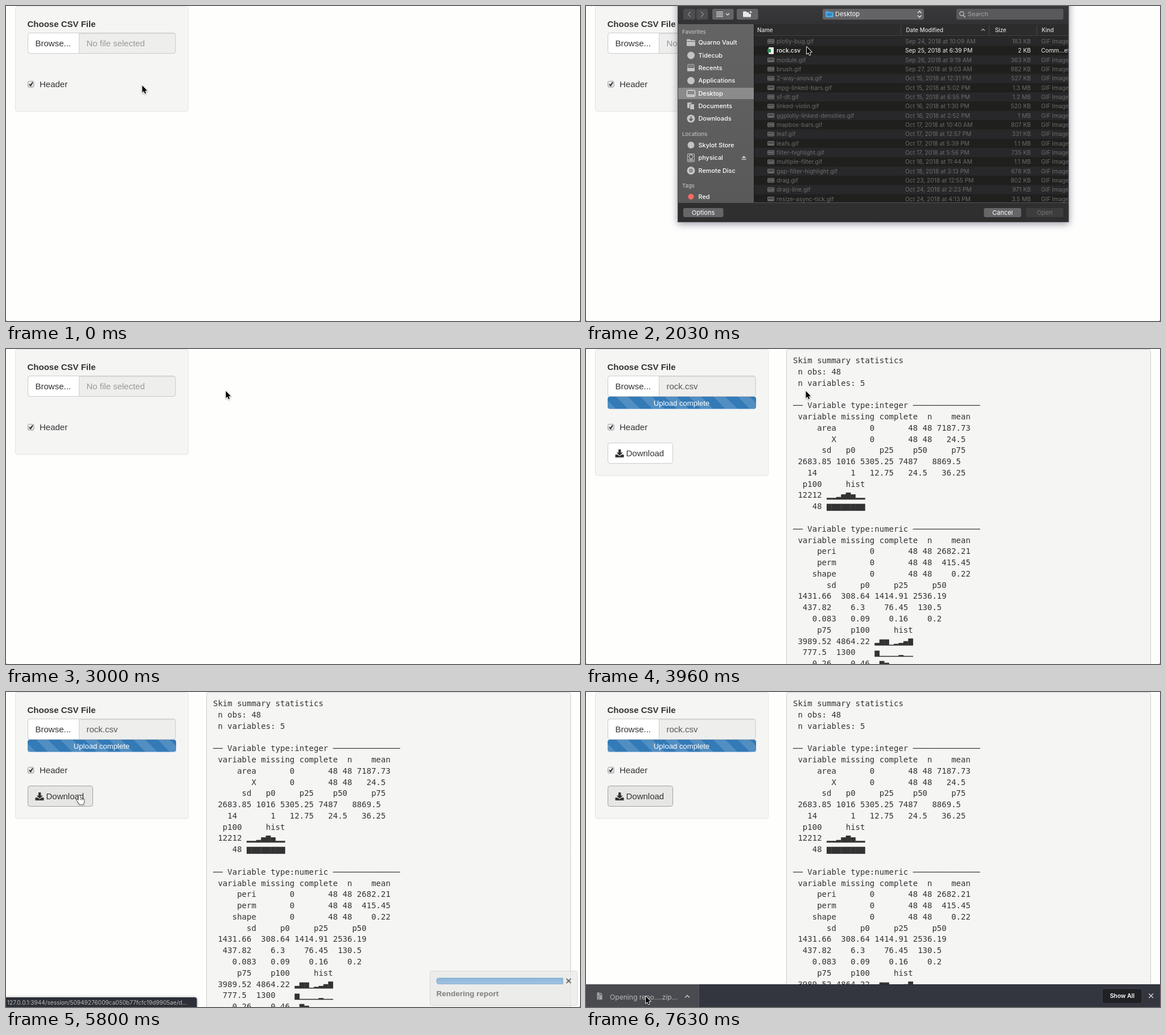
Recreate the animation shown at these times as an HTML page with a canvas. Size 1009 px wide and 555 px high, loop 8000 ms.

```html
<!DOCTYPE html>
<html lang="en">
<head>
<meta charset="utf-8">
<title>Upload and download</title>
<style>
html, body { margin: 0; width: 100%; height: 100%; overflow: hidden; background: #fefefd; }
canvas { display: block; }
</style>
</head>
<body>
<canvas id="stage" width="1009" height="555"></canvas>
<script>
const ctx = document.getElementById('stage').getContext('2d');
const W = 1009, H = 555, LOOP = 8000;
const SANS = '"Liberation Sans", Arial, sans-serif';
const UI = 'Inter, sans-serif';
const MONO = '"DejaVu Sans Mono", monospace';

const clamp = v => Math.max(0, Math.min(1, v));
const span = (t, a, b) => clamp((t - a) / (b - a));
const ease = p => (1 - Math.cos(Math.PI * p)) / 2;

function text(s, x, y, size, color, { font = UI, weight = 400, align = 'left' } = {}) {
  ctx.font = `${weight} ${size}px ${font}`;
  ctx.textAlign = align;
  ctx.fillStyle = color;
  ctx.fillText(s, x, y + size * 0.36);
}

function rect(x, y, w, h, color) {
  ctx.fillStyle = color;
  ctx.fillRect(x, y, w, h);
}

function box(x, y, w, h, r, fill, stroke) {
  ctx.beginPath();
  ctx.roundRect(x, y, w, h, r);
  if (fill) { ctx.fillStyle = fill; ctx.fill(); }
  if (stroke) { ctx.strokeStyle = stroke; ctx.lineWidth = 1; ctx.stroke(); }
}

function line(points, color, width = 1) {
  ctx.beginPath();
  points.forEach(([x, y]) => ctx.lineTo(x, y));
  ctx.strokeStyle = color;
  ctx.lineWidth = width;
  ctx.stroke();
}

function disc(x, y, r, color) {
  ctx.beginPath();
  ctx.arc(x, y, r, 0, 7);
  ctx.fillStyle = color;
  ctx.fill();
}

function ring(x, y, r, color, width, turn = 1) {
  ctx.beginPath();
  ctx.arc(x, y, r, -Math.PI / 2, Math.PI * (2 * turn - 0.5));
  ctx.strokeStyle = color;
  ctx.lineWidth = width;
  ctx.stroke();
}

function gradient(y0, y1, ...colors) {
  const g = ctx.createLinearGradient(0, y0, 0, y1);
  colors.forEach((c, i) => g.addColorStop(i / (colors.length - 1), c));
  return g;
}

function layer(draw, alpha = 1, dx = 0, dy = 0) {
  if (alpha <= 0) return;
  ctx.save();
  ctx.globalAlpha = alpha;
  ctx.translate(dx, dy);
  draw();
  ctx.restore();
}

function clip(x, y, w, h) {
  ctx.beginPath();
  ctx.rect(x, y, w, h);
  ctx.clip();
}

// Pointer: each leg runs from the end of the previous one.
const legs = [
  [260, 800, 111, 60],
  [1340, 1680, 388, 72],
  [2480, 2800, 386.5, 74],
  [3960, 4480, 129, 182],
  [5900, 6350, 113.5, 265],
  [6600, 7050, 105, 536]
];
const ARROW = new Path2D('M0 0V12.6L2.8 9.9L4.8 14.4L6.7 13.6L4.8 9.2H8.8Z');
const HAND = new Path2D('M0 0c1.2 0 1.5 1 1.5 2v3.6c.5-.8 2.3-.6 2.5.5c.6-.8 2.2-.5 2.4.6' +
  'c.8-.5 2 0 2 1.2v3c0 2-1.4 2.6-1.4 5h-7c0-2-3.4-4.7-4.4-6.6c-.7-1.4 1-2.2 2-1.2l1 1.2v-7.3c0-1 .3-2 1.4-2z');

function pointerAt(t) {
  let x = 239.5, y = 140;
  for (const [a, b, toX, toY] of legs) {
    const p = ease(span(t, a, b));
    x += (toX - x) * p;
    y += (toY - y) * p;
  }
  return { x, y };
}

function drawPointer({ x, y }, hand) {
  layer(() => {
    const shape = hand ? HAND : ARROW;
    ctx.lineJoin = 'round';
    ctx.shadowColor = 'rgba(0,0,0,.35)';
    ctx.shadowBlur = 3;
    ctx.shadowOffsetY = 1;
    ctx.strokeStyle = hand ? '#222' : '#fff';
    ctx.lineWidth = hand ? 1.3 : 1.8;
    ctx.stroke(shape);
    ctx.shadowColor = 'transparent';
    ctx.fillStyle = hand ? '#fff' : '#000';
    ctx.fill(shape);
    if (hand) for (const k of [1.7, 4.1, 6.4]) line([[k, 6], [k, 8.5]], '#333', 0.9);
  }, 1, x, y);
}

function drawForm(t, uploaded, ready, hover) {
  box(16.5, 0.5, 304, ready ? 222.5 : 185.5, 4, '#f5f5f4', '#e3e3e2');
  text('Choose CSV File', 37.5, 31.5, 15, '#333', { font: SANS, weight: 700 });

  box(38.5, 47.5, 259.5, 36, 4, '#eeeeed', '#c9c9c8');
  rect(130, 48, 166, 1.5, 'rgba(0,0,0,.06)');
  box(38.5, 47.5, 90, 36, [4, 0, 0, 4], hover.browse ? '#e6e6e5' : '#fff', hover.browse ? '#adadad' : '#ccc');
  text('Browse...', 51.5, 66, 15, '#333', { font: SANS });
  text(uploaded ? 'rock.csv' : 'No file selected', 141.5, 66, 15, uploaded ? '#555' : '#999', { font: SANS });

  if (uploaded) layer(() => {
    box(38, 84, 261, 21.5, 4, '#f1f1f0');
    clip(38, 84, 261 * ease(span(t, 3090, 3650)), 22);
    box(38, 84, 261, 21.5, 4, '#337ab7');
    ctx.clip();
    for (let x = 10; x < 320; x += 42.8) {
      ctx.beginPath();
      [[x, 84], [x + 21, 84], [x + 42.5, 105.5], [x + 21, 105.5]].forEach(p => ctx.lineTo(...p));
      ctx.fillStyle = 'rgba(255,255,255,.15)';
      ctx.fill();
    }
    text('Upload complete', 168, 95, 13.1, '#fff', { font: SANS, align: 'center' });
  });

  box(38.5, 132.5, 10.5, 10.5, 2, gradient(132, 143, '#f4f4f4', '#d8d8d8'), '#9b9b9b');
  line([[41, 137.5], [43.2, 140.3], [47, 134.3]], '#2b2b2b', 2);
  text('Header', 59, 138, 15, '#333', { font: SANS });

  if (ready) {
    const active = hover.download || t > 4550;
    box(38.5, 165.5, 114, 36, 4, active ? '#e6e6e5' : '#fff', active ? '#a2a2a2' : '#ccc');
    rect(57, 177, 4.4, 6, '#333');
    ctx.fill(new Path2D('M53.6 182.5H64.8L59.2 188Z'));
    ctx.fill(new Path2D('M51.5 186H55.5L59.2 189L62.8 186H66.5V191H51.5Z'));
    text('Download', 70.5, 184, 15, '#333', { font: SANS });
  }
}

const HEAD = ' variable missing complete  n    mean';
const rule = type => `── Variable type:${type} ${'─'.repeat(14)}`;
const REPORT = [
  'Skim summary statistics', ' n obs: 48', ' n variables: 5', '',
  rule('integer'), HEAD,
  '     area       0       48 48 7187.73',
  '        X       0       48 48   24.5',
  '      sd   p0     p25    p50     p75',
  ' 2683.85 1016 5305.25 7487   8869.5',
  '   14       1   12.75   24.5   36.25',
  '  p100     hist', ' 12212', '    48', '',
  rule('numeric'), HEAD,
  '     peri       0       48 48 2682.21',
  '     perm       0       48 48  415.45',
  '    shape       0       48 48    0.22',
  '       sd     p0     p25     p50',
  ' 1431.66  308.64 1414.91 2536.19',
  '  437.82    6.3    76.45  130.5',
  '    0.083   0.09    0.16    0.2',
  '     p75    p100     hist',
  ' 3989.52 4864.22', '  777.5  1300', '    0.26    0.46'
];
// row, column, then one level in eighths per bar
const HISTS = [[12, 7, '22368622'], [13, 7, '88888888'], [25, 17, '37712358'], [26, 17, '71111211'], [27, 17, '28632111']];

function drawReport() {
  box(352.5, 0.5, 640, 620, 4, '#f5f5f4', '#ccc');
  const rowY = i => 20 + i * 19.78, cell = 8.43;
  REPORT.forEach((s, i) => text(s, 364, rowY(i), 14, '#333', { font: MONO }));
  for (const [row, col, levels] of HISTS) {
    [...levels].forEach((n, i) => {
      const h = n * 1.55;
      rect(364 + (col + i) * cell, rowY(row) + 8 - h, cell + 0.3, h, '#333');
    });
  }
}

const FILES = `plotly-bug.gif|Sep 24, 2018 at 10:09 AM|183 KB
rock.csv|Sep 25, 2018 at 6:39 PM|2 KB
module.gif|Sep 26, 2018 at 9:19 AM|363 KB
brush.gif|Sep 27, 2018 at 9:03 AM|982 KB
2-way-anova.gif|Oct 15, 2018 at 12:31 PM|527 KB
mpg-linked-bars.gif|Oct 15, 2018 at 5:02 PM|1.3 MB
sf-dt.gif|Oct 15, 2018 at 6:55 PM|1.2 MB
linked-violin.gif|Oct 16, 2018 at 1:30 PM|520 KB
ggplotly-linked-densities.gif|Oct 16, 2018 at 2:52 PM|1 MB
mapbox-bars.gif|Oct 17, 2018 at 10:40 AM|807 KB
leaf.gif|Oct 17, 2018 at 12:57 PM|331 KB
leafs.gif|Oct 17, 2018 at 5:39 PM|1.1 MB
filter-highlight.gif|Oct 17, 2018 at 5:56 PM|735 KB
multiple-filter.gif|Oct 18, 2018 at 11:44 AM|1.1 MB
gap-filter-highlight.gif|Oct 18, 2018 at 3:13 PM|678 KB
drag.gif|Oct 23, 2018 at 12:55 PM|802 KB
drag-line.gif|Oct 24, 2018 at 2:23 PM|971 KB
resize-async-tick.gif|Oct 24, 2018 at 4:13 PM|3.5 MB`.split('\n').map(s => s.split('|'));

const GREY = '#c4c4c4';
const folder = (x, y, w, h, color) => {
  box(x, y, w * 0.45, 4, 1, color);
  box(x, y + 1.5, w, h - 1.5, 1, color);
};
const PLACES = [
  ['Quarno Vault', 64.5, y => { folder(177, y - 6, 15, 12, GREY); line([[177, y - 2], [192, y - 2]], '#666'); }],
  ['Tidecub', 87, y => disc(184.5, y, 6.5, GREY)],
  ['Recents', 109, y => { box(179, y - 6, 11, 9, 1, null, GREY); box(178, y, 13, 6, 1, GREY); line([[181, y - 3], [188, y - 3]], GREY); }],
  ['Applications', 131.5, y => disc(184.5, y, 6.5, GREY)],
  ['Desktop', 154, y => { box(177.5, y - 5.5, 14, 11, 1, null, '#fff'); for (let x = 179; x < 190; x += 3) rect(x, y + 2, 2, 2, '#fff'); }],
  ['Documents', 176, y => { box(178, y - 6, 8, 10, 1, GREY); box(182.5, y - 3.5, 8, 10, 1, GREY, '#5a5a5a'); }],
  ['Downloads', 198.5, y => { disc(184.5, y, 7, GREY); line([[184.5, y - 4], [184.5, y + 3]], '#555', 1.6); line([[181.5, y], [184.5, y + 3.5], [187.5, y]], '#555', 1.6); }],
  ['Skylot Store', 245, y => disc(184.5, y, 6, GREY)],
  ['physical', 267.5, y => { box(178.5, y - 7, 12, 14, 1.5, null, GREY); ring(184.5, y - 2, 3.5, GREY, 1.3); rect(180, y + 3, 9, 2, GREY); }],
  ['Remote Disc', 290, y => { disc(184.5, y, 7, GREY); disc(184.5, y, 3, '#666'); disc(184.5, y, 1.5, GREY); }],
  ['Red', 336, y => disc(184.5, y, 5, '#fb6a64')]
];

function pushButton(label, x, w, fill, color) {
  box(x, 356, w, 16, 3, fill);
  text(label, x + w / 2, 364, 11, color, { align: 'center' });
}

function drawDialog(settled, selected) {
  ctx.shadowColor = 'rgba(0,0,30,.4)';
  ctx.shadowBlur = 12;
  ctx.shadowOffsetY = 3;
  rect(161, -20, 687.5, 401, '#2f2f2f');
  ctx.shadowColor = 'transparent';

  rect(162, 0, 686, 32, gradient(0, 32, '#39393b', '#323234'));
  box(171, 5, 21, 19, 3, '#4d4d4f');
  box(194, 5, 20.5, 19, 3, '#4d4d4f');
  line([[184, 10], [179.5, 14.5], [184, 19]], '#8d8d8f', 1.3);
  line([[202, 10], [206.5, 14.5], [202, 19]], '#8d8d8f', 1.3);
  for (const x of [222, 265]) box(x, 5, 37.5, 19, 3, '#646466');
  for (let y = 10.5; y < 20; y += 2.7) line([[229, y], [241, y]], '#e8e8e8', 1.1);
  line([[246, 13], [249, 16], [252, 13]], '#e8e8e8', 1.3);
  folder(276, 9.5, 14, 10, '#e8e8e8');
  disc(289, 11, 3.2, '#646466');
  line([[289.5, 8.5], [289.5, 13]], '#eee');
  line([[287.2, 10.8], [291.8, 10.8]], '#eee');
  box(416, 5, 178, 19, 3, '#646466');
  folder(421, 9, 14, 11, '#4aa5dd');
  rect(424, 13, 8, 4, '#2f80b8');
  text('Desktop', 438, 14.5, 11, '#fff');
  line([[583, 12.5], [586.3, 9], [589.5, 12.5]], '#eee', 1.3);
  line([[583, 16.5], [586.3, 20], [589.5, 16.5]], '#eee', 1.3);
  box(651, 5, 188, 19, 3, '#59595b');
  ring(660.5, 13.5, 3.6, '#c9c9c9', 1.2);
  line([[663, 16.2], [666.5, 20]], '#c9c9c9', 1.3);
  text('Search', 671, 14.5, 10.9, '#a3a3a5');

  rect(162, 32, 133, 314, settled ? gradient(32, 346, '#646464', '#595959') : '#30302e');
  rect(162, 144, 133, 20, settled ? '#8b8b8b' : '#5a5a5a');
  [['Favorites', 45.5], ['Locations', 226], ['Tags', 317]].forEach(([s, y]) =>
    text(s, 169, y, 9.5, '#bdbdbd', { weight: 500 }));
  for (const [name, y, icon] of PLACES) {
    icon(y);
    text(name, 197.5, y, 10.9, settled ? '#fff' : '#ccc', { weight: settled ? 500 : 400 });
  }
  ctx.fillStyle = GREY;
  ctx.fill(new Path2D('M273.5 268L277.5 263.5L281.5 268ZM273.5 269.5h8v1.5h-8Z'));

  layer(() => {
    clip(295, 32, 553, 314);
    rect(295, 32, 553, 314, '#1f1f1d');
    rect(295, 32, 553, 20, '#2c2c2c');
    rect(295, 52, 553, 1, '#444');
    [['Name', 301], ['Date Modified', 562.5], ['Size', 719], ['Kind', 801]].forEach(([s, x]) =>
      text(s, x, 42, 9.8, '#dedede', { weight: 500 }));
    for (const x of [553, 708, 792]) rect(x, 34, 1, 17, '#4a4a4a');
    line([[695, 43.5], [698, 40.5], [701, 43.5]], '#bbb', 1.1);
    FILES.forEach(([name, date, size], i) => {
      const y = 62.3 + i * 16.33, csv = name.endsWith('.csv');
      if (i % 2 === 0) rect(296, y - 8.2, 553, 16.33, '#28282a');
      if (csv && selected) rect(296, y - 8.2, 553, 16.33, '#0f58d0');
      if (!settled) return;
      if (csv) {
        box(321, y - 6, 9, 12, 1, '#f2f2f2');
        rect(319, y - 3, 6, 6, '#2f8a50');
      } else {
        box(319.5, y - 3.5, 11, 7, 0.5, '#4a4a4a', '#777');
        rect(321, y - 1 + i % 3, 8, 1.5, '#777');
      }
      const color = csv ? '#fff' : '#6c6c6c', soft = csv ? '#efefef' : '#6c6c6c';
      text(name, 335, y, 10.3, color, { weight: csv ? 500 : 400 });
      text(date, 561, y, 10.25, soft);
      text(size, 782, y, 10.25, soft, { align: 'right' });
      text(csv ? 'Comm...et' : 'GIF Image', 800, y, 10.25, soft);
    });
  });

  rect(295, 32, 1, 314, '#151515');
  rect(162, 346, 686, 1, '#565656');
  pushButton('Options', 171, 70.5, '#666668', '#fff');
  pushButton('Cancel', 699.5, 65.5, '#666668', '#fff');
  pushButton('Open', 773.5, 65.5, selected ? '#1f69dc' : '#3d3d3e', selected ? '#fff' : '#757576');
  line([[161.5, 0], [161.5, 380.5], [848, 380.5], [848, 0]], '#4b4b4d');
}

function drawNotice(t) {
  box(745.5, 491.5, 259, 61, 3, '#e8e8e7', '#ccc');
  box(757, 504, 222, 10.5, 4, '#f5f5f4');
  const p = 0.05 * span(t, 4880, 5000) + 0.95 * span(t, 5000, 5700);
  if (p > 0) box(757, 504, 222 * p, 10.5, [4, 0, 0, 4], gradient(504, 514, '#5b95cb', '#76a9d8'), '#6598c8');
  line([[985, 505], [993, 513]], '#444', 2.4);
  line([[993, 505], [985, 513]], '#444', 2.4);
  text('Rendering report', 756.5, 531, 13.5, '#444', { font: SANS, weight: 700 });
}

function drawStatus(t, bottom) {
  ctx.shadowColor = 'rgba(0,0,0,.4)';
  ctx.shadowBlur = 4;
  box(-1, bottom - 17, 336.5, 18, [0, 4, 0, 0], '#2c2f36');
  ctx.shadowColor = 'transparent';
  const path = t < 5600 ? '.../download?w=' : '50949276009ca050b77fcfc19d9905ae/d...';
  text('127.0.0.1:3944/session/' + path, 2, bottom - 8, 10.1, '#b9babc');
}

function drawShelf(t, over) {
  const opening = t >= 7120;
  const shift = opening ? 4.5 : 0;
  rect(0, 0, W, 40, '#33363e');
  rect(0, 0, W, 1, '#25272d');
  if (over) rect(0, 0, 197, 40, '#4a4b50');
  rect(193 + shift, over ? 0 : 5, 1, over ? 40 : 33, '#6a6c72');
  if (!opening) {
    disc(24, 22, 11, '#25272c');
    ring(24, 22, 10.5, '#55585f', 1.3);
    ring(24, 22, 10.5, '#8c8f96', 1.3, span(t, 5900, 6600));
  }
  const paper = opening ? '#a2a3a6' : '#f0f0f0';
  ctx.fillStyle = paper;
  ctx.fill(new Path2D('M19.5 14.5H25.5L28.5 17.5V27H19.5Z'));
  line([[24.5, 14], [24.5, 18.5], [28.5, 18.5]], '#44464b');
  for (const y of [20, 22.5, 25]) rect(21.5, y, 2, 1, '#44464b');
  text(opening ? 'Opening repo....zip...' : 'report (18).zip', 42, 22.5, 12.1, opening ? '#b6b7b9' : '#f1f1f1');
  const c = 173.5 + shift;
  line([[c - 4, 23.5], [c, 19.5], [c + 4, 23.5]], '#cfd0d2', 1.4);
  box(907.5, 7.5, 70, 26.5, 4, '#202125', '#42454b');
  text('Show All', 942.5, 20.5, 10.3, '#fff', { weight: 600, align: 'center' });
  line([[989.5, 16.5], [997, 24]], '#d0d1d3', 1.4);
  line([[997, 16.5], [989.5, 24]], '#d0d1d3', 1.4);
}

function draw(t) {
  const pointer = pointerAt(t), { x, y } = pointer;
  const within = (x0, y0, x1, y1) => x >= x0 && x <= x1 && y >= y0 && y <= y1;
  const uploaded = t >= 3060, ready = t >= 3330;
  const hover = {
    browse: within(38, 47, 128, 84),
    download: ready && within(38, 165, 153, 201)
  };
  rect(0, 0, W, H, '#fefefd');
  drawForm(t, uploaded, ready, hover);
  if (ready) drawReport();

  const down = ease(span(t, 1101, 1311)) - ease(span(t, 2460, 2780));
  if (down > 0) layer(() => drawDialog(t >= 1311, t >= 2080), 1, 0, Math.round(-381 * (1 - down)));

  layer(() => drawNotice(t), span(t, 4640, 4760) - span(t, 5720, 5950));

  const shelfTop = H - 40 * ease(span(t, 5830, 6030));
  if (shelfTop < H) layer(() => drawShelf(t, y > 515), 1, 0, shelfTop);
  layer(() => drawStatus(t, shelfTop), span(t, 4440, 4560) - span(t, 6600, 6780));
  if (t >= 6000 && t < 6620) rect(0, 0, 1, 515, '#c4c4c4');

  rect(0, H - 1, 1, 1, '#555');
  rect(W - 1, H - 1, 1, 1, '#555');
  drawPointer(pointer, hover.browse || hover.download);
}

const start = performance.now();
function tick() {
  draw((performance.now() - start) % LOOP);
  requestAnimationFrame(tick);
}
tick();
</script>
</body>
</html>
```
